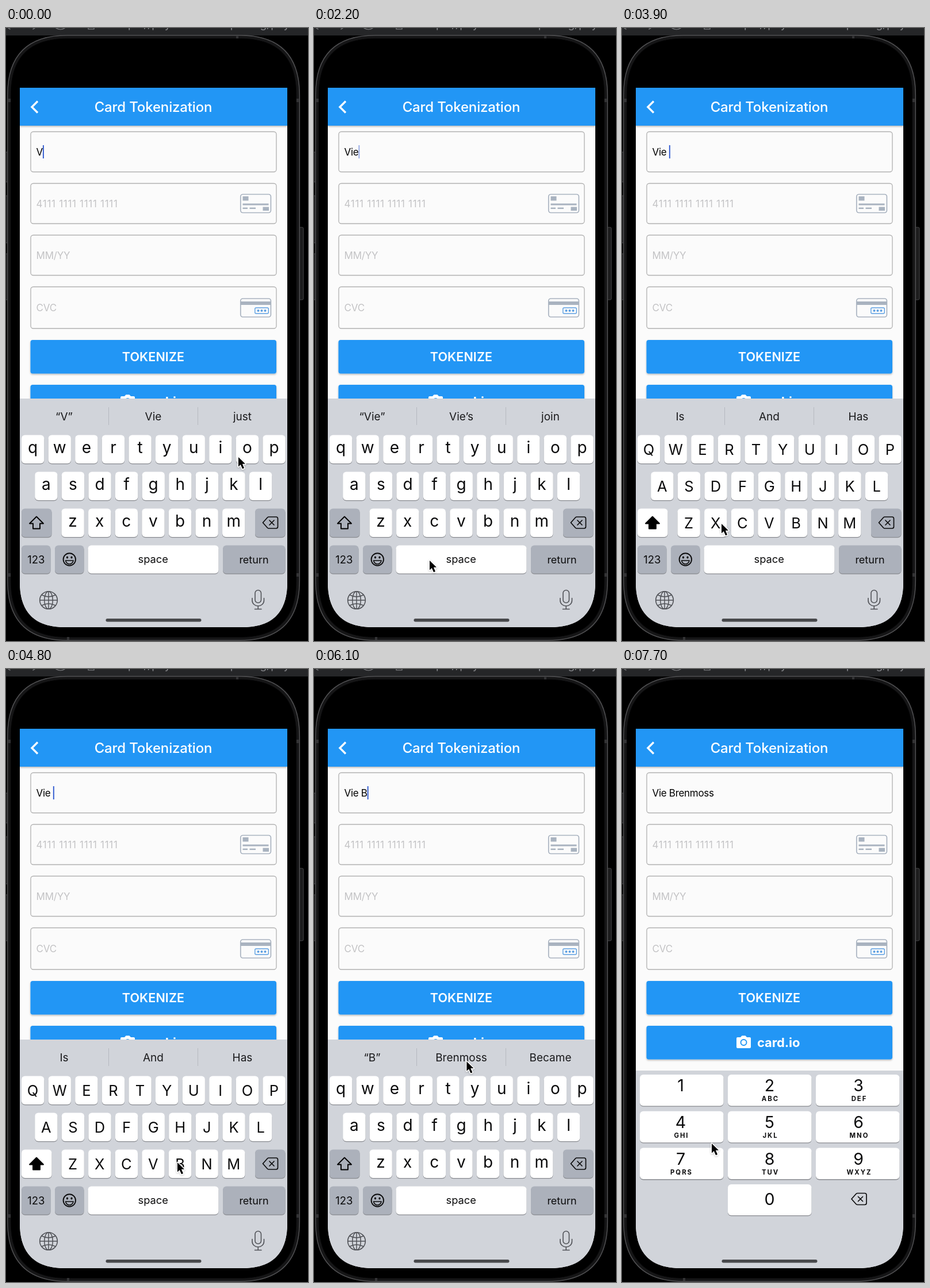
These frames come from a looping animation (525x1067 px, 8 s). An HTML page:

```html
<!DOCTYPE html>
<html lang="en">
<head>
<meta charset="utf-8">
<title>Card form</title>
<style>
  html, body { margin: 0; width: 100%; height: 100%; overflow: hidden; background: #000; }
  svg { display: block; width: 525px; height: 1067px; }
  text { font-family: Inter, "Open Sans", sans-serif; white-space: pre; }
</style>
</head>
<body>
<svg id="stage" viewBox="0 0 525 1067" xmlns="http://www.w3.org/2000/svg">
  <defs>
    <clipPath id="screen"><path d="M24 104H489V965C489 1017 463 1043 411 1043H102C50 1043 24 1017 24 965Z"/></clipPath>
    <filter id="soft" x="-20%" y="-20%" width="140%" height="150%">
      <feDropShadow dx="0" dy="1.6" stdDeviation="1.5" flood-opacity=".28"/>
    </filter>
    <filter id="lift" x="-30%" y="-30%" width="160%" height="160%">
      <feDropShadow dx="0" dy="1" stdDeviation="1.6" flood-opacity=".25"/>
    </filter>
  </defs>
  <g id="phone"></g>
  <g clip-path="url(#screen)">
    <g id="app"></g>
    <g id="letters"></g>
    <g id="numbers"></g>
    <g id="home"></g>
  </g>
  <g id="pointer"></g>
</svg>
<script>
const NS = 'http://www.w3.org/2000/svg';
const $ = id => document.getElementById(id);
const BLUE = '#2096f5', BOARD = '#d1d4da', GREY = '#acb1bb', INK = '#0b0b0c';

function add(parent, tag, attrs, content) {
  const el = document.createElementNS(NS, tag);
  for (const k in attrs) el.setAttribute(k, attrs[k]);
  if (content !== undefined) el.textContent = content;
  parent.appendChild(el);
  return el;
}
const rect = (p, x, y, width, height, fill, rx = 0, more = {}) =>
  add(p, 'rect', { x, y, width, height, fill, rx, ...more });
const path = (p, d, stroke, width, more = {}) =>
  add(p, 'path', { d, fill: 'none', stroke, 'stroke-width': width, 'stroke-linejoin': 'round', 'stroke-linecap': 'round', ...more });
const text = (p, x, y, size, fill, str, more = {}) =>
  add(p, 'text', { x, y, 'font-size': size, fill, ...more }, str);
const mid = (p, x, y, size, fill, str, more = {}) =>
  text(p, x, y, size, fill, str, { 'text-anchor': 'middle', ...more });

// Phone body and what shows behind it
const phone = $('phone');
rect(phone, 0, 0, 525, 13, '#252628');
text(phone, 188, 0, 19, '#85868a', 'https://pay.docs.example.org/pay', { 'letter-spacing': '.1' });
path(phone, 'M4 0l3 2M50 0l-3 2M87 0q8 5 15 0M143 0v2h10v-2', '#6a6b6e', 1.6);
for (const [x, y, h] of [[-3, 216, 52], [-3, 292, 82], [-3, 393, 80], [508, 347, 126]])
  rect(phone, x, y, 9, h, '#1c1c1d', 2, { stroke: '#464648', 'stroke-width': 1 });

// Rounded frame whose corners ease into the sides
function ring(inset, fill, stroke, width) {
  const l = 2.7 + inset, r = 510.3 - inset, t = 12.7 + inset, b = 1066 - inset;
  const s = 104 - inset, c = s * .33;
  path(phone, `M${l + s} ${t}H${r - s}C${r - c} ${t} ${r} ${t + c} ${r} ${t + s}V${b - s}C${r} ${b - c} ${r - c} ${b} ${r - s} ${b}H${l + s}C${l + c} ${b} ${l} ${b - c} ${l} ${b - s}V${t + s}C${l} ${t + c} ${l + c} ${t} ${l + s} ${t}Z`, stroke, width, { fill });
}
ring(0, '#161617', '#505052', 1.5);
ring(5.5, '#000', '#0a0a0b', 1);
for (const [x, y, w, h] of [[400, 13, 4, 5], [106, 1060, 4, 5], [3, 123, 5, 6], [505, 123, 5, 6], [3, 949, 5, 6], [505, 949, 5, 6]])
  rect(phone, x, y, w, h, '#333335');

// Form
const app = $('app');
rect(app, 24, 104, 465, 940, '#fbfbfb');
rect(app, 24, 104, 465, 66, BLUE, 0, { filter: 'url(#soft)' });
path(app, 'M55 127.5L45 137.5L55 147.5', '#fff', 3.4, { 'stroke-linecap': 'butt', 'stroke-linejoin': 'miter' });
mid(app, 256, 146, 24, '#fff', 'Card Tokenization', { 'font-weight': 500, 'letter-spacing': '-.15' });
for (const [y, h] of [[180.5, 70], [270.5, 70], [360.5, 70], [450.5, 72.5]])
  rect(app, 43, y, 427, h, 'none', 4.5, { stroke: '#b1b1b1', 'stroke-width': 1.3 });
const HINT = '#c3c3c5';
text(app, 52.5, 312, 17, HINT, '4111 1111 1111 1111', { 'letter-spacing': '.7' });
text(app, 52.5, 402, 17, HINT, 'MM/YY', { 'letter-spacing': '-.2' });
text(app, 52.5, 493, 17, HINT, 'CVC', { 'letter-spacing': '-.2' });

const SLATE = '#a9b3c0', DOTS = '#5c9fe2';
for (const y of [289.5, 471])
  rect(app, 407.8, y, 52.6, 32, 'none', 4, { stroke: SLATE, 'stroke-width': 1.7 });
for (const [x, y, w, h] of [[411.5, 293, 10, 7.5], [411.5, 305.5, 45, 3], [411.5, 312.5, 8.5, 2.5], [423.5, 312.5, 10.5, 2.5], [446.5, 311.5, 10.5, 6.5], [408, 476, 52, 6]])
  rect(app, x, y, w, h, SLATE);
rect(app, 432.8, 487, 23.5, 10, '#fbfbfb', 2, { stroke: DOTS, 'stroke-width': 1.4 });
for (const cx of [438.5, 444.5, 450.5]) add(app, 'circle', { cx, cy: 492, r: 2, fill: DOTS });

for (const y of [543, 621]) rect(app, 42.5, y, 427.5, 58.5, BLUE, 4, { filter: 'url(#soft)' });
mid(app, 256, 580, 21.5, '#fff', 'TOKENIZE', { 'font-weight': 600, 'letter-spacing': '.1' });
path(app, 'M199 643a2 2 0 0 1 2-2h5l2.500-2.700h6l2.500 2.700h5a2 2 0 0 1 2 2v15a2 2 0 0 1-2 2h-21a2 2 0 0 1-2-2Z', 'none', 0, { fill: '#fff' });
add(app, 'circle', { cx: 211.5, cy: 650, r: 5, fill: '#fff', stroke: BLUE, 'stroke-width': 2 });
text(app, 235, 658, 22, '#fff', 'card.io', { 'font-weight': 700, 'letter-spacing': '-.1' });

const holder = text(app, 52.5, 222, 17, '#000', '', { 'letter-spacing': '-.3' });
const caret = rect(app, 0, 204, 2, 23, '#3a62d2');

// Keyboard parts
function key(p, x, y, w, h, fill = '#fff') {
  rect(p, x, y + 1.3, w, h, '#898b90', 6);
  return rect(p, x, y, w, h, fill, 6);
}
function eraser(p, cx, cy) {
  path(p, `M${cx - 13.5} ${cy}l8-9q1-1 2.500-1h12.500q3 0 3 3v14q0 3-3 3h-12.500q-1.500 0-2.500-1Z`, INK, 1.7);
  path(p, `M${cx - 2} ${cy - 4}l8 8m0-8l-8 8`, INK, 1.7);
}

// Letter keyboard
const abc = $('letters');
rect(abc, 24, 645, 465, 400, BOARD);
for (const x of [178.5, 333.5]) rect(abc, x - .5, 660, 1, 31, '#b6b9c0');
const tips = [101, 256, 411].map(x => mid(abc, x, 683, 19, '#1a1a1c', ''));
const keys = {};
[['qwertyuiop', 27], ['asdfghjkl', 50.2], ['zxcvbnm', 96.5]].forEach(([row, left], r) => {
  [...row].forEach((c, i) => {
    const x = left + i * 46.6, y = 708.5 + r * 64;
    key(abc, x, y, 39.3, 49.5);
    keys[c] = { x, y, label: mid(abc, x + 19.6, y, 28, INK, c) };
  });
});
const shiftKey = key(abc, 27, 836.5, 52.5, 49.5, GREY);
const arrow = path(abc, 'M53 850.500L65 862.500H59V871.500H47V862.500H41Z', '#000', 1.9);
key(abc, 433, 836.5, 52.5, 49.5, GREY);
eraser(abc, 460, 861);
key(abc, 27, 900.5, 50.5, 49, GREY);
mid(abc, 52.3, 931.5, 18.5, INK, '123');
key(abc, 85, 900.5, 50.5, 49, GREY);
add(abc, 'circle', { cx: 110.3, cy: 925, r: 10.7, fill: 'none', stroke: INK, 'stroke-width': 1.9 });
for (const cx of [106.5, 114]) add(abc, 'ellipse', { cx, cy: 921.5, rx: 1.6, ry: 2.1, fill: INK });
path(abc, 'M103.500 927h13.600q-1.500 6-6.800 6t-6.800-6Z', INK, 1.5);
const spaceKey = key(abc, 142.5, 900.5, 227, 49);
mid(abc, 255.7, 930.5, 18.3, INK, 'space');
key(abc, 377, 900.5, 108.5, 49, GREY);
mid(abc, 431, 931.5, 18, INK, 'return');

const LINE = '#505257';
add(abc, 'circle', { cx: 74, cy: 996, r: 15.3, fill: 'none', stroke: LINE, 'stroke-width': 1.6 });
add(abc, 'ellipse', { cx: 74, cy: 996, rx: 7.3, ry: 15.3, fill: 'none', stroke: LINE, 'stroke-width': 1.5 });
path(abc, 'M74 981v30M59 996h30M62.500 987q11.500 6 23 0M62.500 1005q11.500-6 23 0', LINE, 1.5);
rect(abc, 433, 978.5, 10.5, 22, 'none', 5.25, { stroke: LINE, 'stroke-width': 1.6 });
path(abc, 'M428 992.500v4a10.250 9.500 0 0 0 20.500 0v-4M438.250 1006v5.500M432.500 1011.500h11.500', LINE, 1.6);

const bubble = add(abc, 'g', {});
path(bubble, 'M-25-77h50q10 0 10 10v39c0 14-15 14-15 30v42q0 6-6 6h-28q-6 0-6-6v-42c0-16-15-16-15-30v-39q0-10 10-10Z', 'none', 0, { fill: '#fff', filter: 'url(#lift)' });
const big = mid(bubble, 0, -27, 43, INK, '');

// Number keyboard
const pad = $('numbers');
rect(pad, 24, 699, 465, 346, BOARD);
['', 'ABC', 'DEF', 'GHI', 'JKL', 'MNO', 'PQRS', 'TUV', 'WXYZ'].forEach((sub, i) => {
  const col = i % 3, y = 706 + Math.floor(i / 3) * 63.8, cx = 102 + col * 154.5;
  key(pad, 31 + col * 153, y, 145.5, 54.5);
  mid(pad, cx, y + 29, 28.5, INK, i + 1);
  mid(pad, cx + 1.5, y + 46.3, 11.3, INK, sub, { 'font-weight': 700, 'letter-spacing': '2' });
});
key(pad, 184, 897, 145.5, 54);
mid(pad, 256.5, 933, 28.5, INK, '0');
eraser(pad, 412.5, 922.5);

rect($('home'), 173.5, 1028, 166, 5.5, '#47484b', 2.7);

path($('pointer'), 'M1 2V18.500L4.800 15L8 22.300L11 21L7.900 13.800H13Z', '#fff', 3, { fill: '#000', 'paint-order': 'stroke', filter: 'url(#lift)' });

// Timelines: each row starts with its time in ms
const FULL = 'Vie Brenmoss ';
const typed = [[0, 'V'], [300, 'Vi'], [1300, 'Vie'], [2400, 'Vie '], [5000, 'Vie B'], [6600, FULL]];
const offers = [
  [0, '“V”', 'Vie', 'just'],
  [500, '“Vi”', 'Vie', 'join'],
  [1500, '“Vie”', 'Vie’s', 'join'],
  [2400, 'is', 'and', 'has'],
  [3700, 'Is', 'And', 'Has'],
  [5200, '“B”', 'Brenmoss', 'Became'],
  [6600, 'School', 'Development', 'Associates']
];
const presses = [[300, 'i'], [1300, 'e'], [5000, 'b']];
const blinks = [0, 300, 1300, 2400, 3700, 5000, 6600, 7100];
const route = [
  [0, 403, 745], [300, 395, 744], [900, 403, 745], [1000, 396, 745], [1300, 150, 729],
  [1400, 146, 727], [1600, 146, 729], [1900, 186, 850], [2200, 200, 925], [2700, 186, 905],
  [2900, 190, 774], [3000, 176, 790], [3400, 57, 852], [3700, 58, 854], [3900, 172, 861],
  [4300, 288, 860], [4700, 297, 857], [5200, 297, 857], [5400, 309, 737], [5700, 266, 682],
  [6700, 262, 680], [7000, 85, 292], [7400, 85, 292], [7700, 155, 824]
];
const at = (rows, t) => rows.filter(r => r[0] <= t).pop();

function place(t) {
  const i = route.findIndex(r => r[0] > t);
  if (i < 0) return route[route.length - 1].slice(1);
  const [t0, x0, y0] = route[i - 1], [t1, x1, y1] = route[i];
  const k = (t - t0) / (t1 - t0);
  return [x0 + (x1 - x0) * k, y0 + (y1 - y0) * k];
}
function glow(t) {
  const p = (t - blinks.filter(b => b <= t).pop()) % 1000;
  return p < 600 ? Math.min(1, (600 - p) / 200) : Math.max(0, (p - 800) / 200);
}

function draw(t) {
  const upper = t >= 3700 && t < 5200, numeric = t >= 7200, second = t >= 7100;
  holder.textContent = at(typed, t)[1];
  caret.setAttribute('x', second ? 52.5 : 52.5 + holder.getComputedTextLength());
  caret.setAttribute('y', second ? 294 : 204);
  caret.setAttribute('opacity', glow(t));

  at(offers, t).slice(1).forEach((s, i) => { tips[i].textContent = s; });
  for (const c in keys) {
    const { y, label } = keys[c];
    label.textContent = upper ? c.toUpperCase() : c;
    label.setAttribute('y', y + (upper ? 34.7 : 31.5));
    label.setAttribute('font-size', upper ? 25.5 : 28);
  }
  shiftKey.setAttribute('fill', upper ? '#fff' : GREY);
  arrow.setAttribute('fill', upper ? '#000' : 'none');
  spaceKey.setAttribute('fill', t >= 2300 && t < 2400 ? GREY : '#fff');

  const hit = presses.find(([s]) => t >= s && t < s + 200);
  bubble.style.display = hit ? '' : 'none';
  if (hit) {
    const k = keys[hit[1]];
    big.textContent = upper ? hit[1].toUpperCase() : hit[1];
    bubble.setAttribute('transform', `translate(${k.x + 19.6} ${k.y})`);
  }
  abc.style.display = numeric ? 'none' : '';
  pad.style.display = numeric ? '' : 'none';
  $('pointer').setAttribute('transform', `translate(${place(t)})`);
}

const start = performance.now();
let last = -1;
function tick() {
  const t = Math.floor(((performance.now() - start) % 8000) / 100) * 100;
  if (t !== last) draw(last = t);
  requestAnimationFrame(tick);
}
tick();
</script>
</body>
</html>
```
